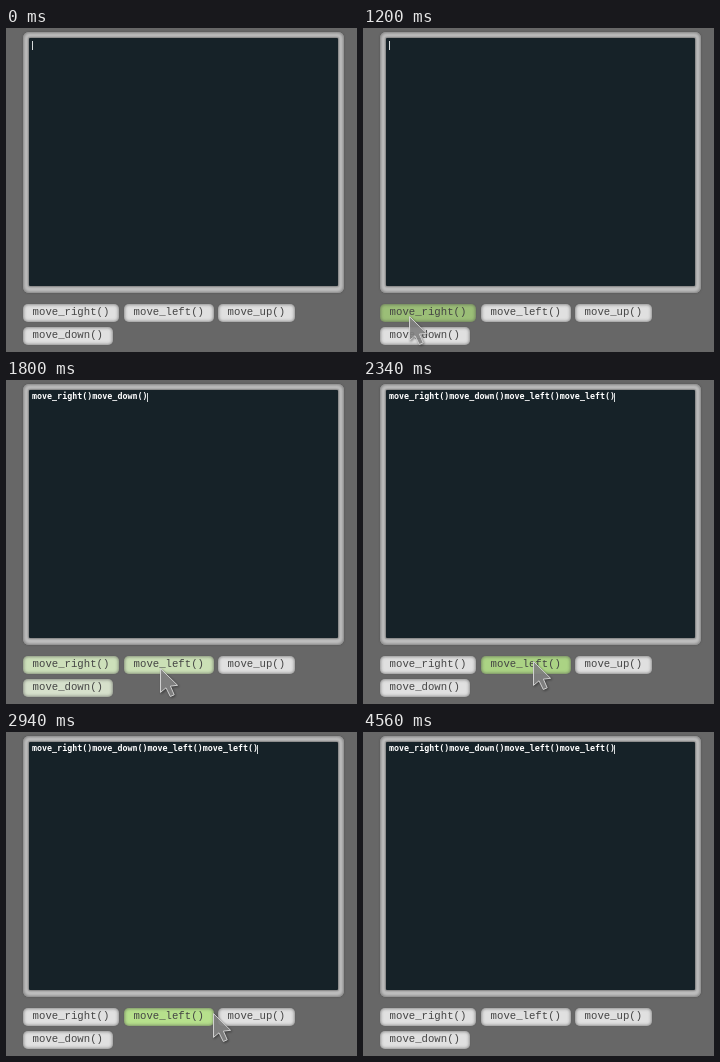
Write an HTML page that moves like this. It is 351 px wide and 324 px high and loops after 4620 ms.

```html
<!DOCTYPE html>
<html lang="en">
<head>
<meta charset="utf-8">
<title>Move commands</title>
<style>
html, body { margin: 0; width: 100%; height: 100%; overflow: hidden; background: #676767; }
#stage { position: relative; width: 351px; height: 324px; overflow: hidden; background: #676767; }
#stage > * { position: absolute; box-sizing: border-box; }
#frame {
  left: 17px; top: 4px; width: 321px; height: 261px; border-radius: 6px;
  background: #bfbfbf;
  box-shadow: inset 0 0 3px 1px #808080, 0 0 2px #4c4c4c;
}
#screen {
  left: 23px; top: 10px; width: 309px; height: 248px; border-radius: 1px;
  background: #162228; box-shadow: 0 0 2px 1px #7c7c7c;
}
#code {
  left: 26px; top: 11px; height: 11px; white-space: pre; color: #fff;
  font: bold 8.35px/11px "DejaVu Sans Mono", "Liberation Mono", monospace;
}
#caret { top: 13px; width: 1px; height: 9px; background: #d6dadb; }
.button {
  height: 18px; border-radius: 5px; padding-left: 9.6px; white-space: pre; color: #444;
  font: 10.67px/17px "Liberation Mono", "DejaVu Sans Mono", monospace;
  box-shadow: inset 0 0 3px 1px rgba(70, 70, 70, .5), 0 0 1px #555;
}
#pointer { left: 0; top: 0; overflow: visible; filter: drop-shadow(1px 1px 1px rgba(0, 0, 0, .45)); }
</style>
</head>
<body>
<div id="stage">
  <div id="frame"></div>
  <div id="screen"></div>
  <div id="code"></div>
  <div id="caret"></div>
  <svg id="pointer" width="20" height="31">
    <path d="M0.5 0.6V24.4L6 19.8L10.3 28.5L14.2 26.8L10.4 18.1L17.6 17.3Z"
      fill="#888" fill-opacity=".85" stroke="#d0d0d0" stroke-linejoin="round"/>
  </svg>
</div>
<script>
const LOOP = 4620, STEP = 60, BLINK = 600, CARET_HOLD = 1000;
const RISE = 240, FALL = 400;
const BASE = [224, 224, 224], HOVER = [182, 224, 140];

const $ = id => document.getElementById(id);
const stage = $('stage'), code = $('code'), caret = $('caret'), pointer = $('pointer');
const clamp = v => Math.min(1, Math.max(0, v));
const mix = (a, b, k) => a + (b - a) * k;

const buttons = [
  { label: 'move_right()', x: 17, y: 276, w: 96 },
  { label: 'move_left()', x: 118, y: 276, w: 90 },
  { label: 'move_up()', x: 212, y: 276, w: 77 },
  { label: 'move_down()', x: 17, y: 299, w: 90 }
];
const [right, left, , down] = buttons;
const clicks = [[1260, right], [1440, down], [2160, left], [2340, left]];

// The pointer rests between glides, which are: start, end, x, y.
const entry = [299, 312];
const glides = [
  [300, 840, 46, 288], [1200, 1380, 51, 303], [1470, 1590, 90, 290],
  [1590, 1800, 154, 288], [1800, 1980, 170, 281], [2340, 2580, 88, 282],
  [2580, 2940, 207, 281], [2940, 3120, 265, 281], [3360, 3600, 283, 281],
  [3600, 3840, 328, 278]
];
// Hover fades stand still here.
const pause = [840, 1200];

const pointerShown = t => t >= 300 && t < 3960;

function pointerAt(t) {
  let [x, y] = entry;
  for (const [from, to, nx, ny] of glides) {
    const s = clamp((t - from) / (to - from)), k = s * s * (3 - 2 * s);
    x = mix(x, nx, k);
    y = mix(y, ny, k);
  }
  return [x, y];
}

function isOver(b, t) {
  const [x, y] = pointerAt(t);
  return pointerShown(t) && x >= b.x && x < b.x + b.w && y >= b.y && y < b.y + 18;
}

function hoverLevel(b, t) {
  let level = 0;
  for (let u = STEP; u <= t; u += STEP) {
    if (u > pause[0] && u < pause[1]) continue;
    level = clamp(level + (isOver(b, u) ? STEP / RISE : -STEP / FALL));
  }
  return level;
}

// Darkest just before the click registers.
function pressLevel(b, t) {
  return Math.max(...clicks.map(([at, target]) =>
    target === b ? clamp(1 - Math.abs(t - at + STEP) / 100) : 0));
}

for (const b of buttons) {
  b.el = document.createElement('div');
  b.el.className = 'button';
  b.el.textContent = b.label;
  b.el.style.cssText = `left:${b.x}px;top:${b.y}px;width:${b.w}px`;
  stage.insertBefore(b.el, pointer);
}

function draw(t) {
  for (const b of buttons) {
    const level = hoverLevel(b, t), shade = 1 - 0.15 * pressLevel(b, t);
    const rgb = BASE.map((v, i) => Math.round(mix(v, HOVER[i], level) * shade));
    b.el.style.backgroundColor = `rgb(${rgb})`;
  }

  const done = clicks.filter(([at]) => t >= at);
  const text = done.map(([, b]) => b.label).join('');
  if (code.textContent !== text) code.textContent = text;

  const typedRecently = done.some(([at]) => t - at < CARET_HOLD);
  const blinkOn = Math.floor((t - 360) / BLINK) % 2 !== 0;
  caret.style.left = Math.floor(26 + text.length * 5.02) + 'px';
  caret.style.visibility = typedRecently || blinkOn ? 'visible' : 'hidden';

  const [x, y] = pointerAt(t).map(Math.round);
  pointer.style.transform = `translate(${x}px, ${y}px)`;
  pointer.style.visibility = pointerShown(t) ? 'visible' : 'hidden';
}

const start = performance.now();
function tick() {
  const t = (performance.now() - start) % LOOP;
  draw(Math.floor(t / STEP) * STEP);
  requestAnimationFrame(tick);
}
draw(0);
requestAnimationFrame(tick);
</script>
</body>
</html>
```
